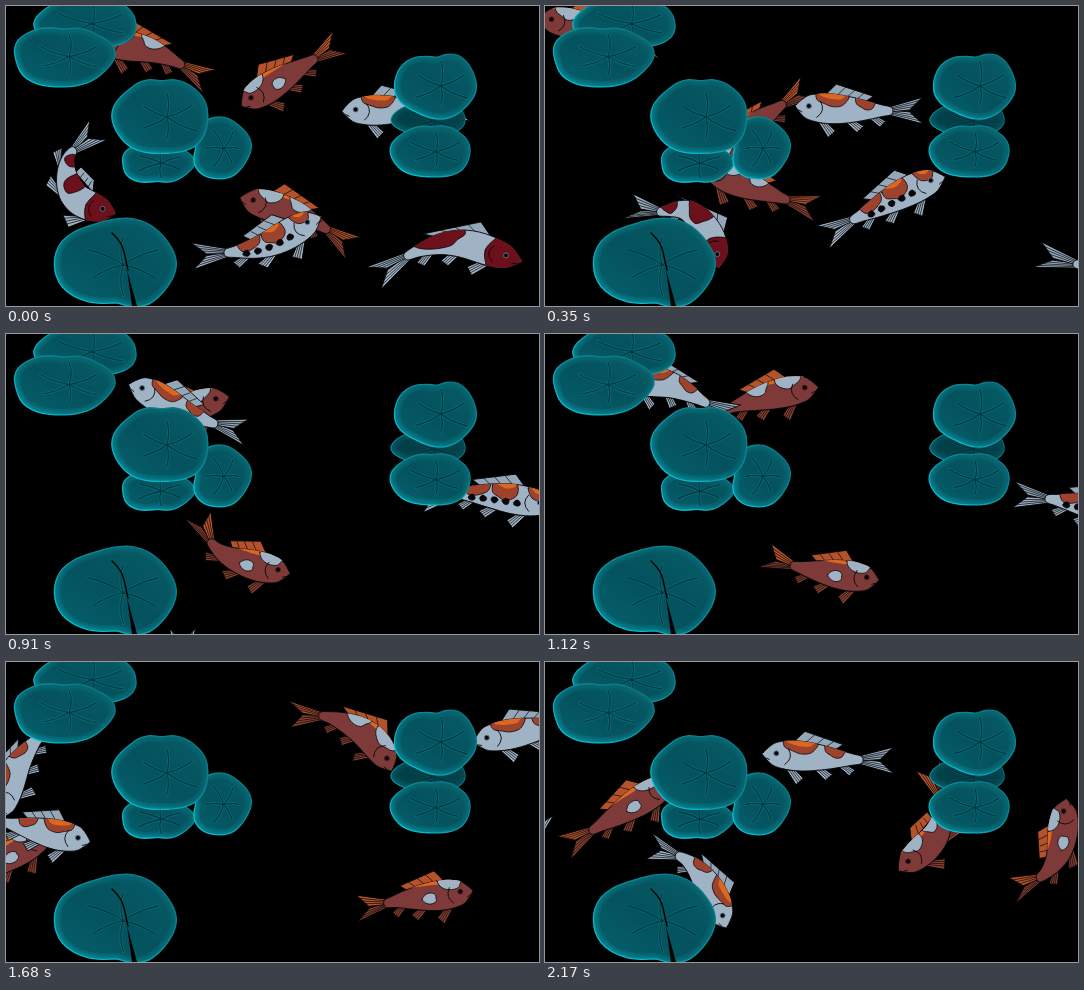
These frames come from a looping animation (533x300 px, 2200 ms). An HTML page:

```html
<!DOCTYPE html>
<html lang="en">
<head>
<meta charset="utf-8">
<title>Koi pond</title>
<style>
html, body { margin: 0; width: 100%; height: 100%; overflow: hidden; background: #000; }
svg { display: block; width: 100vw; height: 100vh; }
path { stroke-linejoin: round; stroke-linecap: round; }
</style>
</head>
<body>
<svg viewBox="0 0 533 300" preserveAspectRatio="none">
  <defs>
    <linearGradient id="leaf" x1="0" y1="1" x2="1" y2="0">
      <stop offset="0" stop-color="#05616d"/><stop offset=".5" stop-color="#04525d"/><stop offset="1" stop-color="#075d68"/>
    </linearGradient>
    <linearGradient id="rim" x1="0" y1="1" x2="1" y2="0">
      <stop offset=".1" stop-color="#06c6da"/><stop offset=".5" stop-color="#0a929f"/><stop offset="1" stop-color="#0a6f7a"/>
    </linearGradient>
  </defs>
  <g id="pond"></g>
  <g id="pads"></g>
</svg>
<script>
const LOOP = 2200, STEP = 70, TAU = Math.PI * 2;
const pond = document.getElementById('pond');
const pads = document.getElementById('pads');

function add(parent, tag, attrs = {}) {
  const node = document.createElementNS('http://www.w3.org/2000/svg', tag);
  for (const key in attrs) node.setAttribute(key, attrs[key]);
  parent.append(node);
  return node;
}
const range = n => [...Array(n).keys()];
const at = p => p[0].toFixed(1) + ' ' + p[1].toFixed(1);
const poly = pts => 'M' + pts.map(at).join('L') + 'Z';
const mix = (a, b, t) => [a[0] + (b[0] - a[0]) * t, a[1] + (b[1] - a[1]) * t];
const random = seed => Math.abs(Math.sin(seed * 127.1) * 43758.5) % 1;

// Smooth curve through all points
function smooth(pts, closed = true) {
  const n = pts.length;
  const get = i => closed ? pts[(i + n) % n] : pts[Math.min(n - 1, Math.max(0, i))];
  let d = 'M' + at(pts[0]);
  for (let i = 0; i < (closed ? n : n - 1); i++) {
    const [a, b, c, e] = [get(i - 1), get(i), get(i + 1), get(i + 2)];
    d += 'C' + at([b[0] + (c[0] - a[0]) / 6, b[1] + (c[1] - a[1]) / 6]) + ' '
       + at([c[0] - (e[0] - b[0]) / 6, c[1] - (e[1] - b[1]) / 6]) + ' ' + at(c);
  }
  return d + (closed ? 'Z' : '');
}

// Uneven ellipse
function lump(cx, cy, rx, ry, seed, rough = .03, count = 24) {
  return range(count).map(i => {
    const a = i / count * TAU;
    const r = 1 + rough * (Math.cos(3 * a + seed) + .7 * Math.cos(5 * a + 2 * seed));
    return [cx + rx * r * Math.cos(a), cy + ry * r * Math.sin(a)];
  });
}

// ---- lily pads; dent is the angle of the notch ----
function pad(cx, cy, rx, ry, dent, shade = 0) {
  const hub = [cx + rx * .12, cy + ry * .02], id = 'pad' + pads.childElementCount;
  const rim = lump(cx, cy, rx, ry, cx).map((p, i) => {
    const gap = Math.cos(i / 24 * TAU - dent);
    return mix(p, hub, .13 * Math.max(0, gap) ** 24);
  });
  const veins = range(6).map(i => {
    const a = dent + i * TAU / 6, reach = .55 + .2 * random(cx + i), curl = i < 3 ? .25 : -.25;
    const point = (angle, r) => at([hub[0] + rx * r * Math.cos(angle), hub[1] + ry * r * Math.sin(angle)]);
    return `M${at(hub)}Q${point(a + curl, reach / 2)} ${point(a, reach)}`;
  }).join('');
  const d = smooth(rim), g = add(pads, 'g');
  add(add(g, 'clipPath', { id }), 'path', { d });
  add(g, 'path', { d, fill: 'url(#leaf)' });
  const inner = add(g, 'g', { 'clip-path': `url(#${id})`, fill: 'none' });
  for (const width of [12, 8, 4]) add(inner, 'path', { d, stroke: 'url(#rim)', 'stroke-width': width, opacity: .14 });
  add(inner, 'path', { d: veins, stroke: '#0b7682', 'stroke-width': 3, opacity: .55 });
  add(inner, 'path', { d: veins, stroke: '#023640', 'stroke-width': 1.1 });
  add(g, 'path', { d, fill: 'none', stroke: 'url(#rim)', 'stroke-width': 1.3 });
  if (shade) add(g, 'path', { d, fill: '#001d24', opacity: shade });
}
const UP = -TAU / 4, DOWN = TAU / 4;
pad(80, 17, 51, 27, UP);
pad(57, 50, 50, 31, UP);
pad(151, 157, 36, 21, DOWN);
pad(214, 142, 30, 31, Math.PI);
pad(155, 110, 48, 39, UP);
pad(423, 114, 37, 17, UP, .38);
pad(430, 79, 41, 33, UP);
pad(425, 145, 40, 27, UP);
pad(110, 258, 61, 45, DOWN);
add(pads, 'path', { d: 'M106 227Q116 236 118 246L122 264', fill: 'none', stroke: '#000', 'stroke-width': 1.4 });
add(pads, 'path', { d: 'M121 264L131 300L126 300Z' });

// ---- koi anatomy: u runs from nose to tail tip, v across the body, back is negative ----
const girth = u => 1.5 + 14 * Math.sin(Math.PI * Math.min(1, u / .82) ** .6);
const half = side => range(11).map(i => i / 10 * .76).map(u => [u, side * girth(u)]);
const BODY = [...half(-1), ...half(.93).reverse()];
const fin = (u, width, height, side = 1) => [
  [u, side * (girth(u) - 1)], [u + width, side * (girth(u + width) - 1)],
  [u + width + .06, side * (girth(u + width) + height * .45)], [u + .08, side * (girth(u) + height)]];
const lobe = side => [[.72, side * 3], [.73, -side], [.9, side], [1, side * 13]];
const TOP_FINS = [fin(.23, .32, 10, -1), lobe(-1)];
const LOW_FINS = [lobe(1), fin(.19, .07, 13), fin(.41, .07, 8), fin(.59, .06, 7)];

const RUST = '#7e3a38', PALE = '#a0b3c5', FLAME = '#dc681f', BRICK = '#9d432d', WINE = '#6c101c', INK = '#07070a';
const RUSTY = { base: RUST, top: '#b4532b', low: '#8a402f' };
const WHITE = { base: PALE, top: '#93a7b8', low: '#9dafc0' };

const mark = (u0, u1, v0, v1, color) => ({ color, pts: lump((u0 + u1) / 2, (v0 + v1) / 2, (u1 - u0) / 2, (v1 - v0) / 2, u0 * 20, .06, 12) });
const back = (u0, u1, depth, color) => mark(u0, u1, -24, depth, color);
const glow = (u0, u1, depth) => [back(u0, u1, depth, BRICK), back(u0 + .02, u1 - .02, -10, FLAME)];
const ridge = mark(-.1, .9, -24, -11, FLAME);
const saddle = [ridge, back(.12, .33, -4, PALE), back(.38, .57, -3, PALE)];
const spotted = [ridge, back(.06, .29, -5, PALE), mark(.31, .43, -4, 7, PALE)];
const patched = [...glow(.15, .42, -3), ...glow(.47, .64, -1)];
const freckles = range(5).map(i => .24 + i * .085).map(u => mark(u, u + .05, 0, 6, INK));
const calico = [...glow(.05, .2, -3), ...glow(.27, .46, 2), ...glow(.48, .68, 1), ...freckles];
const head = mark(-.15, .24, -24, 24, WINE);
const crimson = [head, back(.36, .53, 5, WINE), back(.6, .73, 3, WINE)];
const banded = [head, back(.38, .7, 3, WINE)];

// Each koi swims at an even speed (pixels per step) along its trail; lead is the nose's first distance.
const koi = [
  { look: RUSTY, marks: saddle, size: 125, speed: 19, trail: [[203, 75], [150, 47], [90, 35], [15, 16], [-60, 10]] },
  { look: RUSTY, marks: spotted, size: 116, speed: 16.8, lead: 108, trail: [[327, 41], [237, 99], [200, 130], [189, 168], [221, 222],
    [334, 246], [399, 238], [475, 226], [512, 196], [521, 139]] },
  { look: RUSTY, marks: saddle, size: 124, speed: 17, trail: [[347, 242], [300, 212], [230, 190], [168, 162], [150, 115], [182, 76],
    [288, 52], [356, 70], [390, 120], [392, 172], [339, 220]] },
  { look: WHITE, marks: crimson, size: 126, speed: 20, trail: [[92, 124], [62, 152], [68, 190], [104, 206], [142, 205], [166, 235], [176, 282], [176, 360]] },
  { look: WHITE, marks: banded, size: 158, speed: 27, trail: [[368, 272], [410, 246], [455, 238], [520, 256], [640, 275]] },
  { look: WHITE, marks: calico, size: 135, speed: 18.8, trail: [[187, 250], [255, 241], [314, 211], [391, 174], [462, 160], [608, 184]] },
  { look: WHITE, marks: patched, size: 126, speed: 17.2, trail: [[463, 102], [337, 105], [245, 99], [182, 80], [120, 50], [60, 56], [14, 100], [-10, 170]] },
  { look: RUSTY, marks: spotted, size: 128, speed: 14, lead: -280, trail: [[-3, 199], [81, 148], [130, 117]] },
  { look: WHITE, marks: patched, size: 130, speed: 36, lead: -845, trail: [[487, 76], [362, 98], [217, 92]] },
  { look: WHITE, marks: patched, size: 118, speed: 20, lead: -441, trail: [[45, 172], [141, 198], [180, 262]] }
];

const GRAIN = 3;
koi.forEach((fish, i) => {
  const g = add(pond, 'g', { stroke: INK, 'stroke-width': .9 });
  const { base, top, low } = fish.look, id = 'koi' + i;
  fish.low = add(g, 'path', { fill: low });
  fish.top = add(g, 'path', { fill: top });
  fish.rays = add(g, 'path', { fill: 'none', 'stroke-width': .7 });
  fish.clip = add(add(g, 'clipPath', { id }), 'path');
  fish.body = add(g, 'path', { fill: base });
  const skin = add(g, 'g', { 'clip-path': `url(#${id})`, 'stroke-width': .8 });
  fish.spots = fish.marks.map(m => add(skin, 'path', { fill: m.color, stroke: m.color === FLAME ? 'none' : INK }));
  fish.lines = add(g, 'path', { fill: 'none' });
  fish.eye = add(g, 'circle', { r: 2.5, fill: INK, stroke: base === RUST ? '#55211f' : '#66778a' });

  const line = document.createElementNS('http://www.w3.org/2000/svg', 'path');
  line.setAttribute('d', smooth(fish.trail, false));
  fish.course = range(Math.floor(line.getTotalLength() / GRAIN)).map(k => {
    const { x, y } = line.getPointAtLength(k * GRAIN);
    return [x, y];
  });
});

// Point on the trail; runs straight on beyond both ends
function along(course, distance) {
  const i = Math.max(0, Math.min(course.length - 2, Math.floor(distance / GRAIN)));
  return mix(course[i], course[i + 1], distance / GRAIN - i);
}

// Bends the flat koi onto its trail, back upwards
function bend({ course, size, speed, lead = size }, step) {
  const nose = lead + speed * step;
  const side = along(course, nose)[0] > along(course, nose - size)[0] ? -1 : 1;
  return ([u, v]) => {
    const s = nose - u * size, [x, y] = along(course, s);
    const a = along(course, s + 5), b = along(course, s - 5);
    const dx = b[0] - a[0], dy = b[1] - a[1], k = side * v / (Math.hypot(dx, dy) || 1);
    return [x - dy * k, y + dx * k];
  };
}

const rays = ([a, b, c, d], warp) => [.25, .5, .75].map(t =>
  'M' + at(warp(mix(a, b, t))) + 'L' + at(warp(mix(d, c, t)))).join('');

function draw(step) {
  for (const fish of koi) {
    const warp = bend(fish, step);
    const shape = pts => pts.map(warp), set = (node, d) => node.setAttribute('d', d);
    const fins = list => list.map(f => poly(shape(f))).join('');
    const line = (a, b, c) => `M${at(warp(a))}Q${at(warp(b))} ${at(warp(c))}`;
    const outline = smooth(shape(BODY));
    set(fish.low, fins(LOW_FINS));
    set(fish.top, fins(TOP_FINS));
    set(fish.rays, [...LOW_FINS, ...TOP_FINS].map(f => rays(f, warp)).join(''));
    set(fish.body, outline);
    set(fish.clip, outline);
    fish.marks.forEach((m, i) => set(fish.spots[i], smooth(shape(m.pts))));
    set(fish.lines, line([.19, -7], [.24, 2], [.17, 9]) + line([0, 4], [.03, 3], [.05, 5]));
    const [x, y] = warp([.1, -1.5]);
    fish.eye.setAttribute('cx', x);
    fish.eye.setAttribute('cy', y);
  }
}

let start, shown = 0;
function tick(now) {
  start ??= now;
  const step = Math.floor((now - start) % LOOP / STEP);
  if (step !== shown) draw(shown = step);
  requestAnimationFrame(tick);
}
draw(0);
requestAnimationFrame(tick);
</script>
</body>
</html>
```
